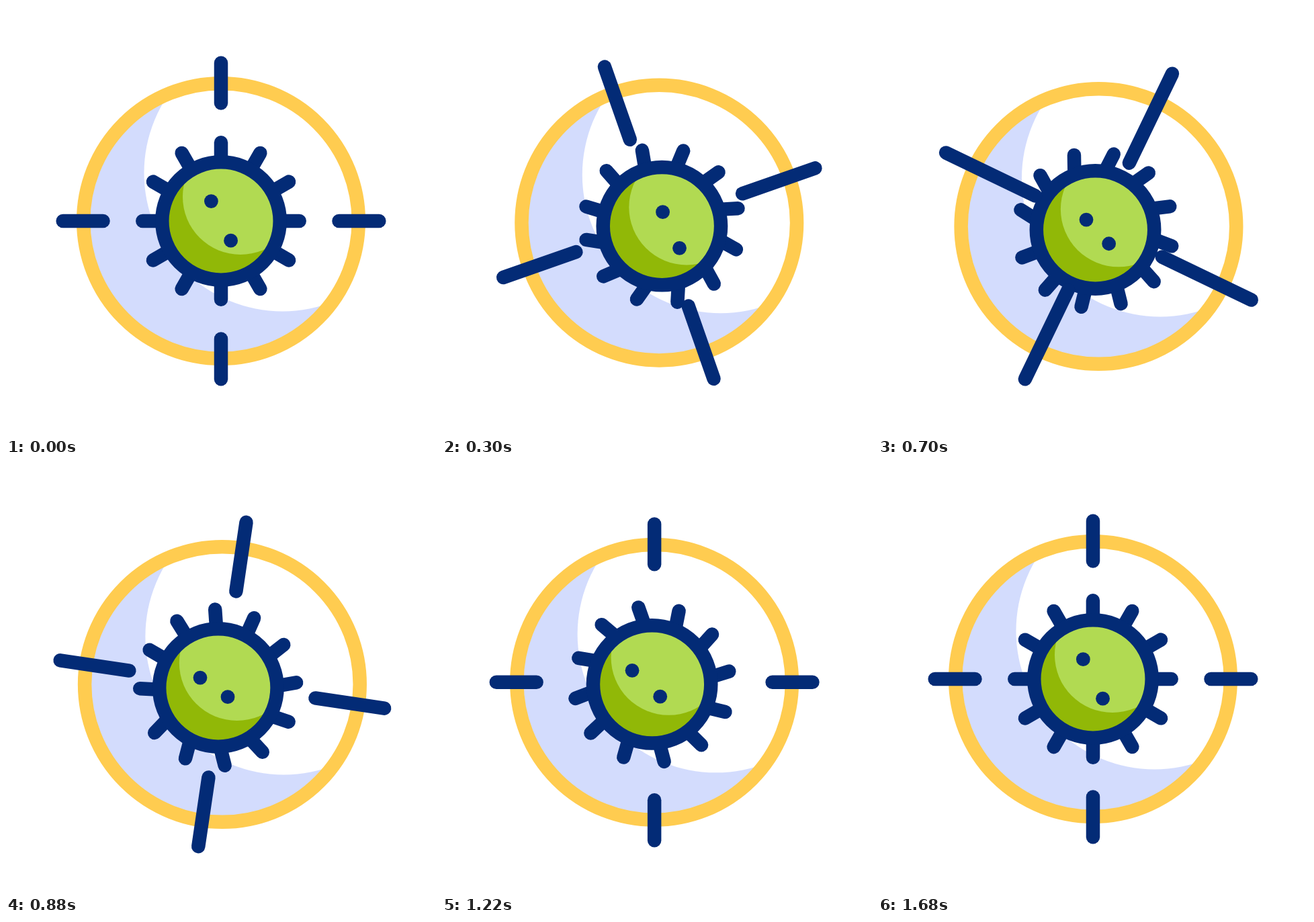
An HTML page with a canvas that plays this animation: 640x640 px, repeating every 1.7 s.

```html
<!DOCTYPE html>
<html lang="en">
<head>
<meta charset="utf-8">
<title>Virus in the crosshair</title>
<style>
html, body { margin: 0; width: 100%; height: 100%; overflow: hidden; background: #fff; }
canvas { display: block; width: 640px; height: 640px; }
</style>
</head>
<body>
<canvas id="stage"></canvas>
<script>
const LOOP = 1700, TURN = 1061, HALF = TURN / 2, LINE = 20.5, RAD = Math.PI / 180;
const NAVY = '#032b76', YELLOW = '#ffcc50', LILAC = '#d3dcfd', LIME = '#b1da52', GREEN = '#91b807';

const canvas = document.getElementById('stage');
const ctx = canvas.getContext('2d');
const dpr = window.devicePixelRatio || 1;
canvas.width = canvas.height = 640 * dpr;

// Smooth step from 0 to 1 between two times
function step(t, from, to) {
  const u = Math.min(1, Math.max(0, (t - from) / (to - from)));
  return u * u * (3 - 2 * u);
}
// Sway from 0 to a high, over to a low, and back to 0
function sway(t, start, top, bottom, end, high, low) {
  return high * step(t, start, top)
    + (low - high) * step(t, top, bottom)
    - low * step(t, bottom, end);
}
// Rise to 1, hold, and return
const swell = (t, start, full, leave) => step(t, start, full) - step(t, leave, LOOP);

const bodySway = (t, high, low) => sway(t, 40, 440, 1080, LOOP, high, low);
const eyeSway = (t, high, low) => sway(t, 0, 380, 1050, LOOP, high, low);
const swing = t => sway(t, 220, 590, 1140, 1680, 27.5, -15);

// Cubic ease with handles (a, 0) and (1 - a, 1)
function ease(x, a) {
  let lo = 0, hi = 1;
  for (let i = 0; i < 24; i++) {
    const s = (lo + hi) / 2, r = 1 - s;
    if (3 * a * s * r * r + 3 * (1 - a) * s * s * r + s * s * s < x) lo = s; else hi = s;
  }
  return lo * lo * (3 - 2 * lo);
}

// Arms lengthen with an ease in, then shrink evenly
function stretch(t) {
  return t < HALF ? (t / HALF) ** 1.5 : Math.max(0, (TURN - t) / HALF);
}

function circle(x, y, r) {
  ctx.beginPath();
  ctx.arc(x, y, r, 0, 2 * Math.PI);
}
function disc(x, y, r, color) {
  circle(x, y, r);
  ctx.fillStyle = color;
  ctx.fill();
}
function hoop(r, color) {
  circle(0, 0, r);
  ctx.strokeStyle = color;
  ctx.stroke();
}
function bar(x1, y1, x2, y2) {
  ctx.beginPath();
  ctx.moveTo(x1, y1);
  ctx.lineTo(x2, y2);
  ctx.strokeStyle = NAVY;
  ctx.stroke();
}
// Disc with an off-centre lighter disc clipped inside it
function shaded(r, dark, light, x, y, lightR) {
  disc(0, 0, r, dark);
  ctx.save();
  circle(0, 0, r);
  ctx.clip();
  disc(x, y, lightR, light);
  ctx.restore();
}
function at(x, y, paint) {
  ctx.save();
  ctx.translate(x, y);
  paint();
  ctx.restore();
}

function drawRing() {
  shaded(204, LILAC, '#fff', 91.5, -71.5, 206);
  hoop(204.8, YELLOW);
}

function drawVirus(t, lift) {
  const spin = bodySway(t, 19, -8);
  // Each spike swings about its foot, a little ahead of the one before
  for (let j = 0; j < 12; j++) {
    const a = (270 + 30 * j + spin) * RAD;
    const b = a + swing(t + 20 * j) * RAD;
    const x = 87.7 * Math.sin(a), y = -87.7 * Math.cos(a);
    bar(x, y, x + 29 * Math.sin(b), y - 29 * Math.cos(b));
  }
  const drift = 0.58 * spin;
  shaded(87, GREEN, LIME, 29 + drift, -36 + drift, 86);
  hoop(87.7, NAVY);
  disc(-14.6 + eyeSway(t, 17.8, -18), -29.4 + 14.5 * lift, 10.4, NAVY);
  disc(14.6 + eyeSway(t, 13, -3), 29.2 + sway(t, 0, 380, 930, LOOP, 4, -16), 10.4, NAVY);
}

function drawArms(t) {
  const k = stretch(t);
  ctx.rotate(-90 * ease(Math.min(t / TURN, 1), 0.27) * RAD);
  for (let i = 0; i < 4; i++) {
    bar(0, -235.3 - 25 * k, 0, -175.5 + 104 * k);
    ctx.rotate(Math.PI / 2);
  }
}

function draw(now) {
  const t = now % LOOP;
  ctx.setTransform(dpr, 0, 0, dpr, 0, 0);
  ctx.fillStyle = '#fff';
  ctx.fillRect(0, 0, 640, 640);
  ctx.translate(320, 320);
  ctx.lineWidth = LINE;
  ctx.lineCap = 'round';
  const x = sway(t, 120, 590, 1120, LOOP, 10, -4.2);
  const y = 8 * swell(t, 60, 680, 860);
  const lift = swell(t, 0, 540, 860);
  at(x, y, drawRing);
  at(bodySway(t, 10.3, -8.5), 13 * lift, () => drawVirus(t, lift));
  at(x, y, () => drawArms(t));
}

let start;
function tick(now) {
  if (start === undefined) start = now;
  draw(Math.max(0, now - start));
  requestAnimationFrame(tick);
}
draw(0);
requestAnimationFrame(tick);
</script>
</body>
</html>
```
